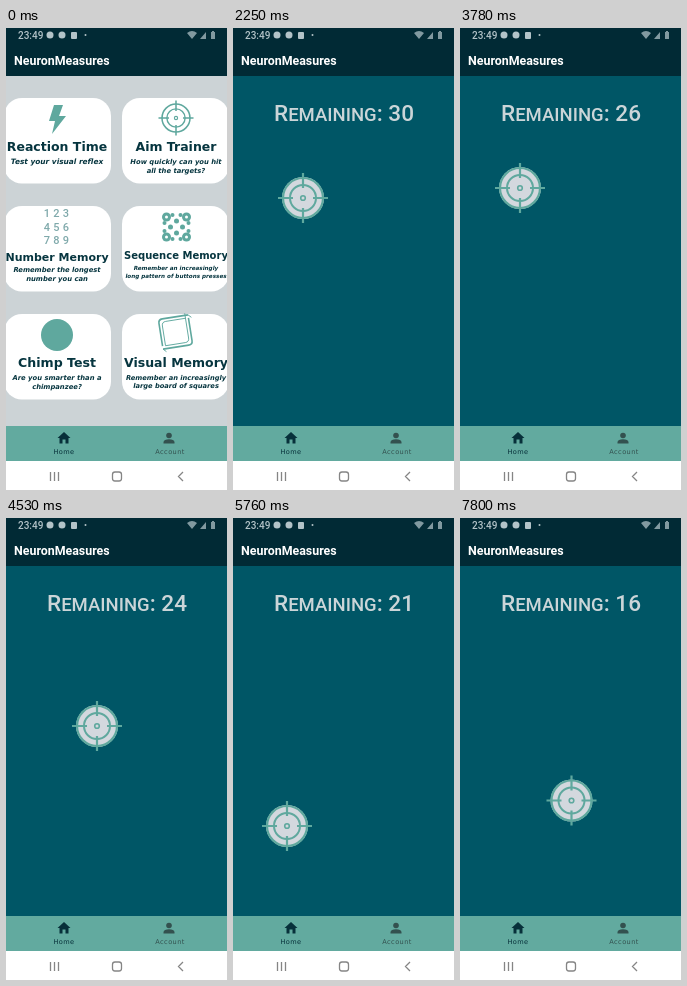
Write an HTML page that moves like this. It is 221 px wide and 462 px high and loops after 8000 ms.

```html
<!DOCTYPE html>
<html lang="en">
<head>
<meta charset="utf-8">
<title>Aim Trainer</title>
<style>
  html, body { margin: 0; width: 100%; height: 100%; overflow: hidden; background: #005666; }
  svg { display: block; width: 100%; height: 100%; }
  .app { font: bold 12.4px Roboto, sans-serif; fill: #fff; }
  .card { font-family: "DejaVu Sans", sans-serif; font-weight: bold; text-anchor: middle; fill: #06353f; }
  .sub { font-style: italic; }
  .caps { font-family: Roboto, sans-serif; font-weight: 500; text-anchor: middle; fill: #cbd5d8; }
  .tab { font: 6.6px "DejaVu Sans", sans-serif; letter-spacing: .4px; text-anchor: middle; }
  .line { fill: none; stroke: #5fa89e; }
  .teal { fill: #5fa89e; }
</style>
</head>
<body>
<svg viewBox="0 0 221 462" preserveAspectRatio="none">
  <defs>
    <g id="cross" class="line">
      <circle r="20" stroke-width="2.2"/>
      <circle r="13" stroke-width="2"/>
      <path d="M0-25V-10M0 10V25M-25 0H-10M10 0H25" stroke-width="2.2"/>
      <circle r="2.3" stroke-width="1.6"/>
    </g>
    <g id="aim"><circle r="21" fill="#d3d8de"/><use href="#cross"/></g>
  </defs>

  <rect width="221" height="462" fill="#005666"/>

  <g id="menu">
    <rect y="48" width="221" height="350" fill="#ccd3d6"/>
    <g id="cards"></g>
    <path class="teal" d="M48 77H57L53 88H60L46 106L49 93H43Z"/>
    <use href="#cross" transform="translate(170 90) scale(.7)"/>
    <g id="digits" fill="#7fa9ab" font-family="Roboto, sans-serif" font-size="11" font-weight="500" text-anchor="middle"></g>
    <g id="dots" class="teal" transform="translate(170.5 199)"></g>
    <circle class="teal" cx="51" cy="307" r="16"/>
    <g class="line" transform="translate(169.5 304) rotate(-9)">
      <path d="M-15 12V-11Q-15-15-11-15H15M15-12V11Q15 15 11 15H-15" stroke-width="1.6"/>
      <path d="M12-17V8Q12 12 8 12H-12V-8Q-12-12-8-12H12M-15 15L-12 18M15-15L18-12" stroke-width=".9"/>
    </g>
  </g>

  <g id="intro">
    <use href="#aim" x="110.5" y="134"/>
    <circle cx="194.5" cy="344" r="12" fill="none" stroke="#d5dde0" stroke-width="3"/>
    <text x="194.5" y="351" text-anchor="middle" fill="#d5dde0" font-family="Noto Serif, serif" font-size="20" font-weight="bold" font-style="italic">i</text>
  </g>

  <g id="game">
    <use id="target" href="#aim"/>
  </g>

  <rect width="221" height="48" fill="#012a35"/>
  <g fill="#b3c3c8">
    <text x="12" y="10.5" font-family="Roboto, sans-serif" font-size="10" font-weight="500">23:49</text>
    <circle cx="44" cy="7" r="3.5"/>
    <circle cx="56" cy="7" r="3.5"/>
    <rect x="65" y="4" width="6" height="7" rx="1"/>
    <circle cx="79.5" cy="7" r="1"/>
    <path d="M181 5Q186 1 191 5L186 11ZM194 11L200 4V11ZM205 4H206V3H208V4H209V11H205Z" fill="#8199a0"/>
  </g>
  <text class="app" x="8" y="37">NeuronMeasures</text>

  <rect y="398" width="221" height="35" fill="#62aa9f"/>
  <g fill="#07303a">
    <path d="M58 404L51.5 410H53.5V415.5H56.5V411.5H59.5V415.5H62.5V410H64.5Z"/>
    <text class="tab" x="58" y="426">Home</text>
  </g>
  <g fill="#33514f">
    <circle cx="163" cy="407.5" r="2.8"/>
    <path d="M157.5 415.5V414Q158 411.5 163 411.3Q168 411.5 168.5 414V415.5Z"/>
    <text class="tab" x="164" y="426">Account</text>
  </g>

  <rect y="433" width="221" height="29" fill="#fff"/>
  <g fill="none" stroke="#858585" stroke-width="1.3">
    <path d="M44.5 444V453M48.5 444V453M52.5 444V453M177 444L172.5 448.5L177 453"/>
    <rect x="106.5" y="444" width="9" height="9" rx="2.5"/>
  </g>
</svg>
<script>
const $ = id => document.getElementById(id);
const add = (id, markup) => $(id).insertAdjacentHTML('beforeend', markup);

// Lower case becomes reduced capitals
const smallCaps = s => s.replace(/[a-z]+/g, m => `<tspan font-size=".82em">${m.toUpperCase()}</tspan>`);
const caps = (parent, s, y, size, id = '') =>
  add(parent, `<text${id && ` id="${id}"`} class="caps" x="111" y="${y}" font-size="${size}">${smallCaps(s)}</text>`);

// column, row, title, size, baseline, subtitle size, baseline, lines
const cards = [
  [0, 0, 'Reaction Time', 12.5, 122.5, 7.4, 136, 'Test your visual reflex'],
  [1, 0, 'Aim Trainer', 12.5, 122.5, 6.8, 135.5, 'How quickly can you hit', 'all the targets?'],
  [0, 1, 'Number Memory', 11, 233, 6.8, 243.5, 'Remember the longest', 'number you can'],
  [1, 1, 'Sequence Memory', 10, 230.5, 5.65, 242, 'Remember an increasingly', 'long pattern of buttons presses'],
  [0, 2, 'Chimp Test', 12.6, 338.5, 6.8, 351.5, 'Are you smarter than a', 'chimpanzee?'],
  [1, 2, 'Visual Memory', 12.5, 338.5, 6.7, 351.5, 'Remember an increasingly', 'large board of squares']
];
for (const [col, row, title, size, y, subSize, subY, ...lines] of cards) {
  const x = 51 + col * 119;
  add('cards', `<rect x="${col ? 116 : -2}" y="${70 + row * 108}" width="107" height="85.5" rx="18" fill="#fff"/>
    <text class="card" x="${x}" y="${y}" font-size="${size}">${title}</text>` +
    lines.map((s, i) => `<text class="card sub" x="${x}" y="${subY + i * subSize * 1.33}" font-size="${subSize}">${s}</text>`).join(''));
}
for (let i = 0; i < 9; i++)
  add('digits', `<text x="${41 + i % 3 * 9.5}" y="${189 + Math.floor(i / 3) * 13.5}">${i + 1}</text>`);
for (let a = 0; a < 360; a += 90)
  add('dots', `<g transform="rotate(${a})">
    <circle cx="10" cy="10" r="4.5"/><circle cx="10" cy="10" r="1.5" fill="#fff"/>
    <circle cx="4" cy="12" r="2"/><circle cx="12" cy="4" r="2"/><circle cx="6" r="2.5"/></g>`);

caps('intro', 'Aim Trainer', 93, 22.6);
caps('intro', 'Hit 30 targets as quickly as', 211, 15.5);
caps('intro', 'you can.', 229, 15.5);
caps('intro', 'Click the target above to begin.', 247, 15.5);
caps('game', 'Remaining: 30', 93, 22.6, 'count');

// start time and target centre of each round
const rounds = [
  [2160, 70, 170], [2610, 150, 320], [3030, 151, 224], [3360, 80, 290], [3750, 60, 160],
  [4140, 160, 170], [4530, 91, 208], [4980, 150, 300], [5340, 120, 160], [5760, 54, 308],
  [6240, 100, 210], [6630, 144.5, 368], [7050, 70, 250], [7440, 160, 190], [7800, 111.5, 282.5]
];
const show = (id, on) => $(id).style.display = on ? '' : 'none';
let last;

function draw(now) {
  const t = now % 8000;
  const n = rounds.filter(r => t >= r[0]).length;
  show('menu', t < 1350);
  show('intro', t >= 1350 && !n);
  show('game', n);
  if (n && n !== last) {
    const [, x, y] = rounds[n - 1];
    $('target').setAttribute('transform', `translate(${x} ${y})`);
    $('count').innerHTML = smallCaps(`Remaining: ${31 - n}`);
  }
  last = n;
  requestAnimationFrame(draw);
}
draw(performance.now());
</script>
</body>
</html>
```
